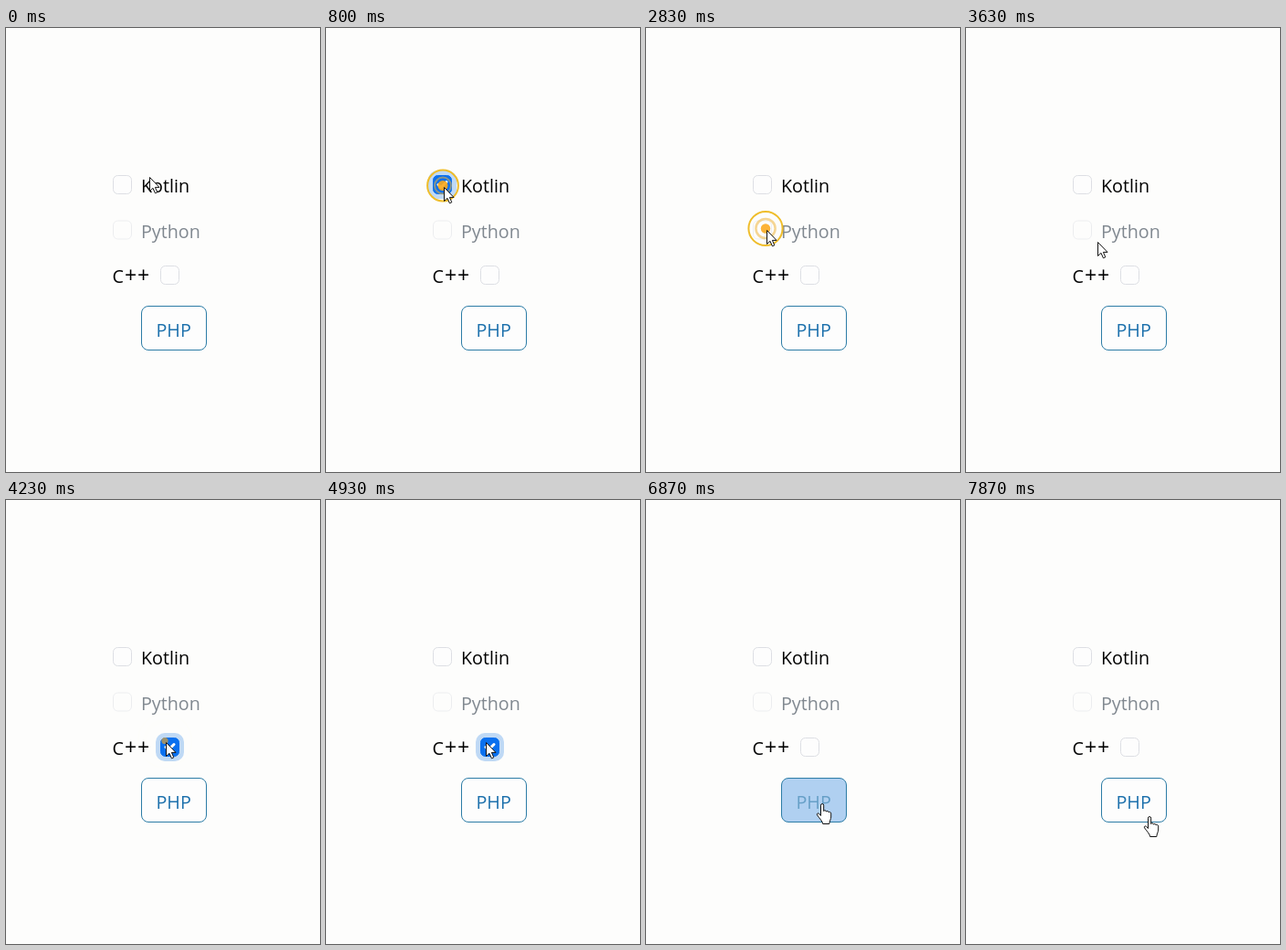
Write an HTML page that moves like this. It is 344 px wide and 486 px high and loops after 8.13 s.

```html
<!DOCTYPE html>
<html lang="en">
<head>
<meta charset="utf-8">
<title>Checkboxes and toggle button</title>
<style>
html, body { margin: 0; width: 100%; height: 100%; overflow: hidden; background: #fdfdfc; }
svg { display: block; width: 344px; height: 486px; }
text { font: 19.7px "Open Sans", "Noto Sans", sans-serif; }
.box { fill: #fdfdfd; stroke: #dddfe4; }
.halo { fill: #bfd9f5; display: none; }
.tick { fill: none; stroke: #fff; stroke-width: 3; stroke-linecap: round; stroke-linejoin: round; display: none; }
.focus .halo, .on .tick { display: inline; }
.focus .box { stroke: #8fbbe8; }
.on .box { fill: #0a70ee; stroke: #0a70ee; }
.cursor { fill: #fff; stroke: #111; stroke-linejoin: round; }
</style>
</head>
<body>
<svg viewBox="0 0 344 486">
  <defs>
    <g id="parts">
      <rect class="halo" x="-5" y="-5" width="31" height="31" rx="10"/>
      <rect class="box" x=".5" y=".5" width="20" height="20" rx="5"/>
      <path class="tick" d="M6 10.5l3 3 6-6"/>
    </g>
  </defs>
  <g id="kotlin" transform="translate(117 161)"></g>
  <g id="python" transform="translate(117 210.5)" opacity=".5"></g>
  <g id="cpp" transform="translate(169 260)"></g>
  <text x="148" y="180">Kotlin</text>
  <text x="148" y="230" fill="#808890">Python</text>
  <text x="116.5" y="279" letter-spacing="1">C<tspan font-size="23">++</tspan></text>
  <rect x="148.5" y="304.5" width="71" height="48" rx="7.5" fill="#fdfdfd"/>
  <rect id="button" x="148.5" y="304.5" width="71" height="48" rx="7.5" fill="#1072d8" stroke="#2c7ca6"/>
  <text id="php" x="164.5" y="337.5">PHP</text>
  <g id="pulse">
    <circle id="ring" fill="none" stroke="#efbd2a" stroke-width="2"/>
    <circle id="inner" fill="none" stroke="#efb53c"/>
    <circle id="dot" fill="#fba81a"/>
  </g>
  <path id="arrow" class="cursor" d="M.5.5V15.5L4 12.3 6.4 17.8 8.8 16.8 6.4 11.4H11Z"/>
  <path id="hand" class="cursor" d="M-1.5 13.5V2.2a1.6 1.6 0 0 1 3.2 0V8.5c.4-1.2 2.6-1 2.8.6 .5-1 2.5-.8 2.7.8 .6-.8 2.5-.4 2.5 1.2V15c0 2-1.6 4-1.9 7.5H.7C.5 19.5-3.5 16-5.5 12.8c-.8-1.4 1-2.6 2.2-1.4Z"/>
</svg>
<script>
const LOOP = 8130, PULSE = 240;
const $ = id => document.getElementById(id);
const set = (id, attrs) => { for (const k in attrs) $(id).setAttribute(k, attrs[k]); };
const clamp = v => Math.max(0, Math.min(1, v));
const between = (t, a, b) => t >= a && t < b;
const ease = u => u * u * (3 - 2 * u);

for (const id of ["kotlin", "python", "cpp"]) $(id).innerHTML = $("parts").innerHTML;

const home = { x: 157, y: 163 };
const moves = [
  { from: 30, to: 760, x: 129, y: 174 },
  { from: 1870, to: 2490, x: 132, y: 221 },
  { from: 3430, to: 4000, x: 175, y: 265 },
  { from: 5200, to: 5630, x: 193, y: 332 },
  { from: 6880, to: 7230, x: 185, y: 378 },
  { from: 7430, to: 7870, x: 201, y: 346 }
];
const clicks = [760, 1430, 1722, 2770, 4040, 5130, 5870, 6430];

function pointer(t) {
  let { x, y } = home;
  for (const m of moves) {
    const e = ease(clamp((t - m.from) / (m.to - m.from)));
    x += (m.x - x) * e;
    y += (m.y - y) * e;
  }
  return [x, y];
}

function drawPulse(t) {
  const start = clicks.find(c => between(t, c, c + PULSE));
  $("pulse").style.display = start ? "" : "none";
  if (!start) return;
  const [x, y] = pointer(start), age = (t - start) / PULSE;
  const r = 13.5 + 20 * age, fade = clamp((.8 - age) * 2);
  set("pulse", { transform: `translate(${x - 1} ${y - 1.5})` });
  set("ring", { r, opacity: fade });
  set("inner", { r: r - 8, opacity: fade * .55, "stroke-width": 1 + 6 * age });
  set("dot", { r: 6 - 3 * age, opacity: 1 - .5 * age });
}

function drawBox(id, focus, on) {
  $(id).classList.toggle("focus", focus);
  $(id).classList.toggle("on", on);
}

function draw(t) {
  drawBox("kotlin", between(t, 770, 2400), between(t, 800, 1500));
  drawBox("cpp", between(t, 4090, 5870), between(t, 4130, 5200));

  const fill = clamp((t - 5910) / 150) - clamp((t - 6770) / 150);
  const mix = c => Math.round(c + (255 - c) * fill);
  set("button", { "fill-opacity": fill });
  set("php", { fill: `rgb(${mix(28)},${mix(112)},${mix(172)})` });

  drawPulse(t);
  const [x, y] = pointer(t).map(Math.round);
  const over = between(x, 148, 220) && between(y, 304, 353);
  $("arrow").style.display = over ? "none" : "";
  $("hand").style.display = over ? "" : "none";
  set(over ? "hand" : "arrow", { transform: `translate(${x} ${y})` });
}

const begin = performance.now();
function tick() {
  draw((performance.now() - begin) % LOOP);
  requestAnimationFrame(tick);
}
tick();
</script>
</body>
</html>
```
